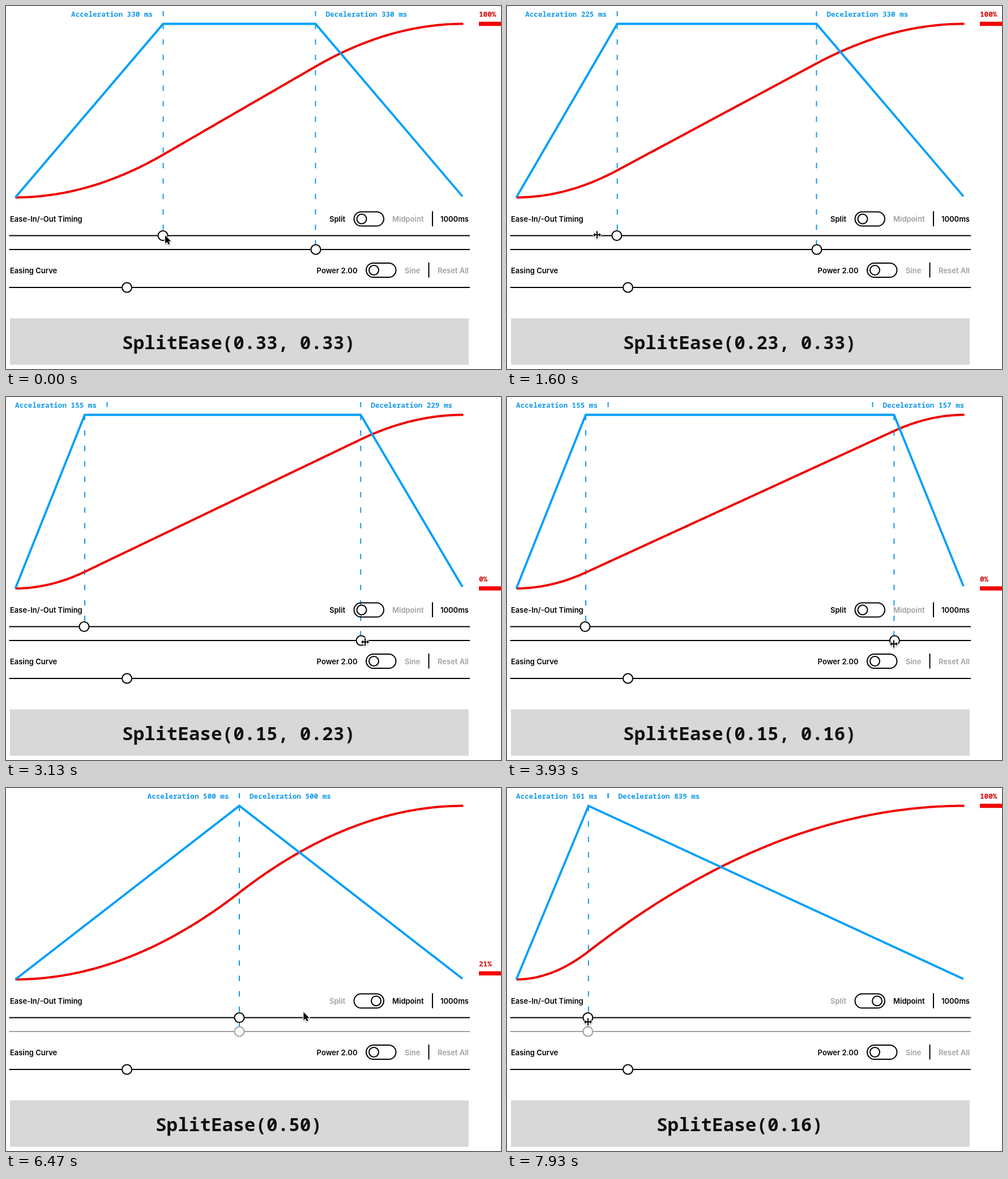
Write an HTML page with a canvas that moves like this. It is 874 by 641 pixels and loops after 8000 ms.

```html
<!DOCTYPE html>
<html lang="en">
<head>
<meta charset="utf-8">
<title>Split easing editor</title>
<style>
html, body { margin: 0; width: 100%; height: 100%; overflow: hidden; background: #fff; }
canvas { display: block; }
</style>
</head>
<body>
<canvas id="stage" width="874" height="641"></canvas>
<script>
const ctx = document.getElementById('stage').getContext('2d');
const LOOP = 8000, STEP = 1000 / 15;
const BLUE = '#009ffa', LABEL = '#1499e8', RED = '#ee0000', GREY = '#a0a0a0', INK = '#000';
const SANS = '600 13px Inter, sans-serif';
const MONO = 'bold 12.63px "Noto Sans Mono", "DejaVu Sans Mono", monospace';
const CODE = 'bold 32.7px "Noto Sans Mono", "DejaVu Sans Mono", monospace';

const TOGGLE_AT = 6010;
const accelKeys = [[1270, .33], [1600, .2252], [1730, .1549]];
const decelKeys = [[2800, .33], [3400, .157]];
const midKeys = [[7200, .5], [7333, .479], [7790, .161]];
// Playback runs: start, duration, from, to
const runs = [[2080, 1000, 1, 0], [4070, 1000, 0, 1], [6090, 434, 1, 0], [6524, 1000, 0, 1]];
const pointerX = [[1200, 281], [1600, 159], [1730, 139], [2080, 139], [2530, 541], [2740, 541],
  [3390, 683], [4180, 683], [4900, 655], [6100, 655], [6800, 413], [7150, 413], [7333, 379], [7750, 143]];
const pointerY = [[1200, 405], [1600, 404], [2080, 406], [2530, 430], [2740, 430], [3390, 434],
  [3930, 436], [4180, 436], [4900, 384], [6100, 384], [6800, 406], [7333, 407], [7930, 413]];

const smooth = x => x * x * (3 - 2 * x);
const linear = x => x;

function track(keys, t, ease = linear) {
  if (t <= keys[0][0]) return keys[0][1];
  for (let i = 1; i < keys.length; i++) {
    const [t0, v0] = keys[i - 1], [t1, v1] = keys[i];
    if (t <= t1) return v0 + (v1 - v0) * ease((t - t0) / (t1 - t0));
  }
  return keys[keys.length - 1][1];
}

function splitEase(x, a, d) {
  const v = 1 / (1 - a / 2 - d / 2);
  if (x < a) return v * x * x / (2 * a);
  if (x < 1 - d) return v * (x - a / 2);
  return 1 - v * (1 - x) ** 2 / (2 * d);
}

function playback(t, a, d) {
  let value = 1;
  for (const [start, span, from, to] of runs) {
    if (t < start) break;
    value = from + (to - from) * splitEase(Math.min(1, (t - start) / span), a, d);
  }
  return value;
}

const graphX = x => 16.5 + 791 * x;
const graphY = y => 338 - 306.5 * y;
const sliderX = x => 15 + 794 * x;

function text(str, x, y, font, color, align = 'left') {
  ctx.font = font;
  ctx.fillStyle = color;
  ctx.textAlign = align;
  ctx.fillText(str, x, y);
}

function path(points, color, width) {
  ctx.beginPath();
  points.forEach(([x, y]) => ctx.lineTo(x, y));
  ctx.strokeStyle = color;
  ctx.lineWidth = width;
  ctx.stroke();
}

function circle(x, y, r, color) {
  ctx.beginPath();
  ctx.arc(x, y, r, 0, Math.PI * 2);
  ctx.fillStyle = '#fff';
  ctx.fill();
  ctx.strokeStyle = color;
  ctx.lineWidth = 2;
  ctx.stroke();
}

function slider(x, y, color = INK) {
  path([[5.5, y], [819, y]], color, 2);
  circle(x, y, 8.5, color);
}

function toggle(x, y, on) {
  ctx.beginPath();
  ctx.roundRect(x, y - 12.5, 52.5, 25, 12.5);
  ctx.strokeStyle = INK;
  ctx.lineWidth = 2;
  ctx.stroke();
  circle(x + 13.5 + 25.5 * on, y, 8.5, INK);
}

function dashes(x, bottom) {
  ctx.setLineDash([9.5, 17.77]);
  path([[x, 31.5], [x, bottom]], LABEL, 2);
  ctx.setLineDash([]);
}

function graph(a, d, midpoint) {
  dashes(graphX(a), midpoint ? 430 : 398);
  if (!midpoint) dashes(graphX(1 - d), 422);

  const curve = [];
  for (let i = 0; i <= 200; i++) curve.push([graphX(i / 200), graphY(splitEase(i / 200, a, d))]);
  path(curve, RED, 4);
  const end = .998;
  path([[16.5, 338], [graphX(a), 31.5], [graphX(1 - d), 31.5],
    [graphX(end), graphY((1 - end) / d)]], BLUE, 3.8);

  const tickA = Math.max(178.5, graphX(a));
  const tickD = midpoint ? tickA : Math.min(645.5, graphX(1 - d));
  for (const x of [tickA, tickD]) path([[x, 9], [x, 18]], LABEL, 2);
  text(`Acceleration ${Math.round(a * 1000)} ms`, tickA - 18.5, 19, MONO, LABEL, 'right');
  text(`Deceleration ${Math.round(d * 1000)} ms`, tickD + 18, 19, MONO, LABEL);
}

function marker(value, shown) {
  const y = graphY(value);
  ctx.fillStyle = '#f50000';
  ctx.fillRect(835, y - 3.7, 39, 7.4);
  text(Math.round(shown * 100) + '%', 835, y - 12.5, MONO, '#d40808');
}

function controls(a, d, midpoint, knob) {
  text('Ease-In/-Out Timing', 7, 380.5, SANS, INK);
  text('Split', 599, 380.5, SANS, midpoint ? GREY : INK, 'right');
  toggle(614.5, 376, knob);
  text('Midpoint', 682, 380.5, SANS, midpoint ? INK : GREY);
  path([[753, 362.5], [753, 389]], INK, 2);
  text('1000ms', 817, 380.5, SANS, INK, 'right');

  text('Easing Curve', 7, 472, SANS, INK);
  text('Power 2.00', 620.5, 472, SANS, INK, 'right');
  toggle(636, 466.5, 0);
  text('Sine', 704, 472, SANS, GREY);
  path([[746.5, 453], [746.5, 479.5]], INK, 2);
  text('Reset All', 817, 472, SANS, GREY, 'right');

  slider(sliderX(a), 405.5);
  slider(sliderX(1 - d), 430, midpoint ? GREY : INK);
  slider(213.5, 497);
}

const shapes = {
  arrow: 'M0 0V14.5L3.4 11.4L5.7 16.2L8.2 15L6 10.4H10.4Z',
  resize: 'M-7 0L-3.5 -3.5V-1H-1V-6.5H1V-1H3.5V-3.5L7 0L3.5 3.5V1H1V6.5H-1V1H-3.5V3.5Z',
  hand: 'M-4.5 -6.5C-3.5 -8.3 -2 -7.3 -1.7 -6L-.8 -2.5C.2 -3.4 1.6 -3.1 2 -2' +
    'C3 -2.9 4.3 -2.4 4.6 -1.3C5.8 -2 6.8 -1 6.8 .3V4L5.5 8H-1.5L-6 2.3' +
    'C-6.5 .8 -5 .3 -4 1.3L-2.8 2.5Z'
};
for (const key in shapes) shapes[key] = new Path2D(shapes[key]);

function pointer(t) {
  let kind = 'resize';
  if (t < 1130 || (t > 2140 && t < 2460) || (t > 4220 && t < 4750) || (t > 6250 && t < 6700)) kind = 'arrow';
  else if (t >= 4750 && t <= 6250) kind = 'hand';
  const shape = shapes[kind];
  ctx.save();
  ctx.translate(track(pointerX, t, smooth), track(pointerY, t, smooth));
  ctx.lineJoin = 'round';
  ctx.shadowColor = 'rgba(0,0,0,.35)';
  ctx.shadowBlur = 2;
  ctx.shadowOffsetY = 1;
  ctx.strokeStyle = '#fff';
  ctx.lineWidth = 2.4;
  ctx.stroke(shape);
  ctx.shadowColor = 'transparent';
  ctx.fillStyle = kind === 'hand' ? '#fff' : '#000';
  ctx.fill(shape);
  if (kind === 'hand') {
    ctx.strokeStyle = '#000';
    ctx.lineWidth = 1.2;
    ctx.stroke(shape);
    for (const x of [-.2, 2, 4.2]) path([[x, 2.5], [x, 5.5]], '#000', .8);
  }
  ctx.restore();
}

function draw(t) {
  const midpoint = t >= TOGGLE_AT;
  const a = track(midpoint ? midKeys : accelKeys, t);
  const d = midpoint ? 1 - a : track(decelKeys, t, smooth);
  const knob = Math.max(0, Math.min(1, (t - TOGGLE_AT + 60) / 100));

  ctx.fillStyle = '#fff';
  ctx.fillRect(0, 0, 874, 641);
  graph(a, d, midpoint);
  marker(playback(t, a, d), playback(t - 82, a, d));
  controls(a, d, midpoint, knob);

  ctx.fillStyle = '#d8d8d8';
  ctx.fillRect(7, 551.5, 810, 82);
  const args = midpoint ? a.toFixed(2) : `${a.toFixed(2)}, ${d.toFixed(2)}`;
  text(`SplitEase(${args})`, 411, 605.5, CODE, '#111', 'center');
  pointer(t);
}

const origin = performance.now();
function frame() {
  const t = (performance.now() - origin) % LOOP;
  draw(Math.floor((t + 5) / STEP) % 120 * STEP);
  requestAnimationFrame(frame);
}
frame();
</script>
</body>
</html>
```
